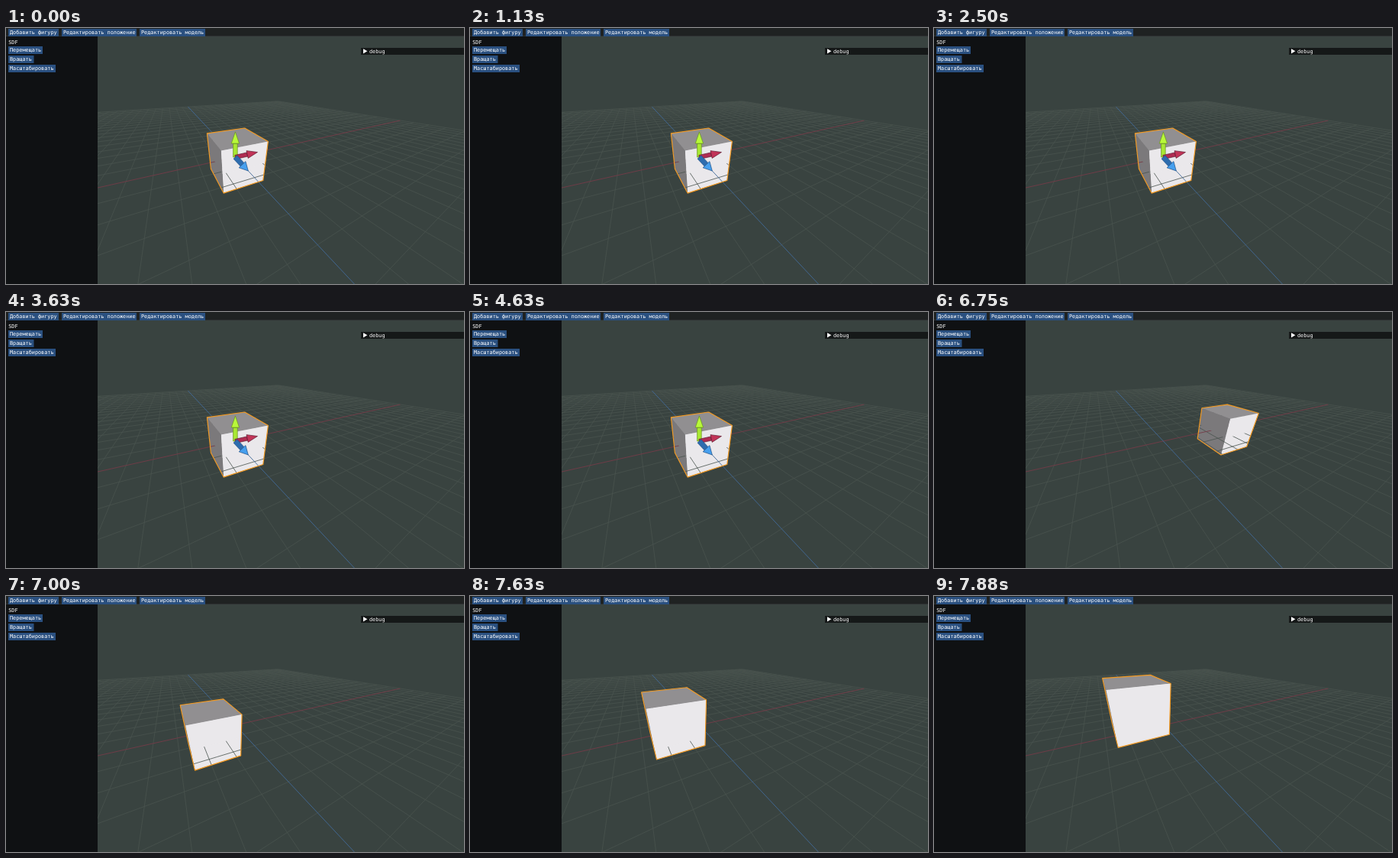
Animation of 600x335 px, one loop 8 s. Source, as an HTML page with a canvas:

```html
<!DOCTYPE html>
<html lang="ru">
<head>
<meta charset="utf-8">
<style>
html, body { margin: 0; width: 100%; height: 100%; overflow: hidden; background: #394340; }
canvas, svg { position: absolute; left: 0; top: 0; width: 600px; height: 335px; }
text { font: 6.83px "DejaVu Sans Mono", "Noto Sans Mono", monospace; fill: #fff; white-space: pre; }
.btn { fill: #2a5080; }
</style>
</head>
<body>
<canvas id="view" width="600" height="335"></canvas>
<svg viewBox="0 0 600 335">
  <rect width="120" height="335" fill="#0f1113"/>
  <rect width="600" height="11" fill="#1f2222"/>
  <rect y="10.3" width="600" height=".7" fill="#34393a"/>
  <rect x="465" y="26" width="135" height="9" fill="#151818"/>
  <path d="M468 27.2L473.4 30.3L468 33.4Z" fill="#fff"/>
  <text x="476" y="32.8">debug</text>
  <text x="3.2" y="20.6">SDF</text>
  <g id="buttons"></g>
</svg>
<script>
const LOOP = 8000;
const CX = 300.4, CY = 169, FOCAL = 173, NEAR = 0.03;
const HALF = 0.16, CELL = 0.1368, CELLS = 20, ARROW = 0.198;

// Camera looks at the world origin from distance 1.
const RIGHT = [0.9096, 0, 0.4157];
const UP = [0.2022, 0.8738, -0.4423];
const AHEAD = [0.3632, -0.4863, -0.7948];

// [start ms, x, y, gizmo shown]
const STEPS = [
  [0, 0, 0, 1],
  [5630, 0.016, 0, 0],
  [6375, 0.24, 0, 0],
  [6500, 0.55, 0, 0],
  [6630, 0.64, 0, 0],
  [6750, 0.624, 0, 0],
  [6880, 0.22, 0, 0],
  [7000, -0.19, 0, 0],
  [7130, -0.19, 0, 1],
  [7500, -0.19, 0.03, 0],
  [7630, -0.19, 0.09, 0],
  [7750, -0.19, 0.15, 0],
  [7880, -0.19, 0.179, 0]
];

const BUTTONS = [
  [3, 1, 66, "Добавить фигуру"],
  [73, 1, 98, "Редактировать положение"],
  [175, 1, 86, "Редактировать модель"],
  [3, 24, 45, "Перемещать"],
  [3, 36, 33.5, "Вращать"],
  [3, 48, 62, "Масштабировать"]
];

document.getElementById("buttons").innerHTML = BUTTONS.map(([x, y, w, label]) =>
  `<rect class="btn" x="${x}" y="${y}" width="${w}" height="10"/>` +
  `<text x="${x + 2}" y="${y + 7.4}">${label}</text>`).join("");

const canvas = document.getElementById("view");
const ratio = window.devicePixelRatio || 1;
canvas.width = 600 * ratio;
canvas.height = 335 * ratio;
const ctx = canvas.getContext("2d");
ctx.scale(ratio, ratio);
ctx.lineJoin = "round";

const dot = (a, b) => a[0] * b[0] + a[1] * b[1] + a[2] * b[2];
const toCam = p => [dot(p, RIGHT), dot(p, UP), 1 + dot(p, AHEAD)];
const toScreen = c => [CX + FOCAL * c[0] / c[2], CY - FOCAL * c[1] / c[2]];
const project = p => toScreen(toCam(p));

function trace(points) {
  ctx.beginPath();
  points.forEach(p => ctx.lineTo(p[0], p[1]));
}

function fill(points, color) {
  trace(points);
  ctx.closePath();
  ctx.fillStyle = color;
  ctx.fill();
}

function stroke(color, width) {
  ctx.strokeStyle = color;
  ctx.lineWidth = width;
  ctx.stroke();
}

function line3(p, q, color, width) {
  let a = toCam(p), b = toCam(q);
  if (a[2] < NEAR && b[2] < NEAR) return;
  if (a[2] < b[2]) [a, b] = [b, a];
  if (b[2] < NEAR) {
    const k = (a[2] - NEAR) / (a[2] - b[2]);
    b = a.map((v, i) => v + (b[i] - v) * k);
  }
  trace([toScreen(a), toScreen(b)]);
  stroke(color, width);
}

function drawGrid() {
  const end = CELL * CELLS;
  for (let i = -CELLS; i <= CELLS; i++) {
    if (!i) continue;
    const s = i * CELL;
    line3([s, 0, -end], [s, 0, end], "#49534f", 0.8);
    line3([-end, 0, s], [end, 0, s], "#49534f", 0.8);
  }
  line3([-end, 0, 0], [end, 0, 0], "#743c48", 0.9);
  line3([0, 0, -end], [0, 0, end], "#426a98", 0.9);
}

// The three faces that look at the camera, between two heights.
function drawBox(x, low, high) {
  if (high <= low) return;
  const l = x - HALF, r = x + HALF, b = -HALF, f = HALF;
  const face = (color, ...pts) => fill(pts.map(project), color);
  face("#7b797b", [l, high, b], [l, high, f], [l, low, f], [l, low, b]);
  face("#918f91", [l, high, b], [r, high, b], [r, high, f], [l, high, f]);
  face("#eae8eb", [l, high, f], [r, high, f], [r, low, f], [l, low, f]);
}

function hull(points) {
  const cross = (o, a, b) => (a[0] - o[0]) * (b[1] - o[1]) - (a[1] - o[1]) * (b[0] - o[0]);
  const half = list => {
    const out = [];
    for (const p of list) {
      while (out.length > 1 && cross(out.at(-2), out.at(-1), p) <= 0) out.pop();
      out.push(p);
    }
    return out.slice(0, -1);
  };
  const sorted = [...points].sort((a, b) => a[0] - b[0] || a[1] - b[1]);
  return [...half(sorted), ...half(sorted.reverse())];
}

function drawOutline(pos) {
  const corners = [];
  for (let i = 0; i < 8; i++) {
    corners.push(project(pos.map((v, k) => v + (i >> k & 1 ? HALF : -HALF))));
  }
  trace(hull(corners));
  ctx.closePath();
  stroke("#f39a22", 1.15);
}

function drawArrow(pos, axis, size, shaftColor, headColor, edge, shaft, head) {
  const a = project(pos);
  const b = project(pos.map((v, k) => v + (k === axis ? size : 0)));
  const dx = b[0] - a[0], dy = b[1] - a[1], len = Math.hypot(dx, dy);
  const at = (t, side) => [a[0] + dx * t - dy / len * side, a[1] + dy * t + dx / len * side];
  const neck = 0.54;
  fill([at(0, -shaft), at(neck, -shaft), at(neck, shaft), at(0, shaft)], shaftColor);
  stroke(edge, 0.7);
  fill([at(neck, -head), at(1, 0), at(neck, head)], headColor);
  ctx.closePath();
  stroke(edge, 0.7);
}

function drawGizmo(pos) {
  const size = ARROW * toCam(pos)[2];
  drawArrow(pos, 1, size, "#a9e832", "#b8f83a", "#668f22", 2.8, 5.2);
  drawArrow(pos, 0, size, "#b02c52", "#c23458", "#5c1a30", 2.6, 5);
  drawArrow(pos, 2, size, "#2d6cae", "#469fee", "#1f4f86", 3.2, 6);
}

function draw(time) {
  const [, x, y, gizmo] = STEPS.findLast(s => s[0] <= time);
  const pos = [x, y, 0], low = y - HALF, high = y + HALF;
  ctx.fillStyle = "#394340";
  ctx.fillRect(0, 0, 600, 335);
  // The floor plane crosses the cube: its lines cover only the part below.
  drawBox(x, low, high);
  drawGrid();
  drawBox(x, Math.max(low, 0), high);
  drawOutline(pos);
  if (gizmo) drawGizmo(pos);
}

const start = performance.now();
function tick() {
  draw((performance.now() - start) % LOOP);
  requestAnimationFrame(tick);
}
tick();
</script>
</body>
</html>
```
